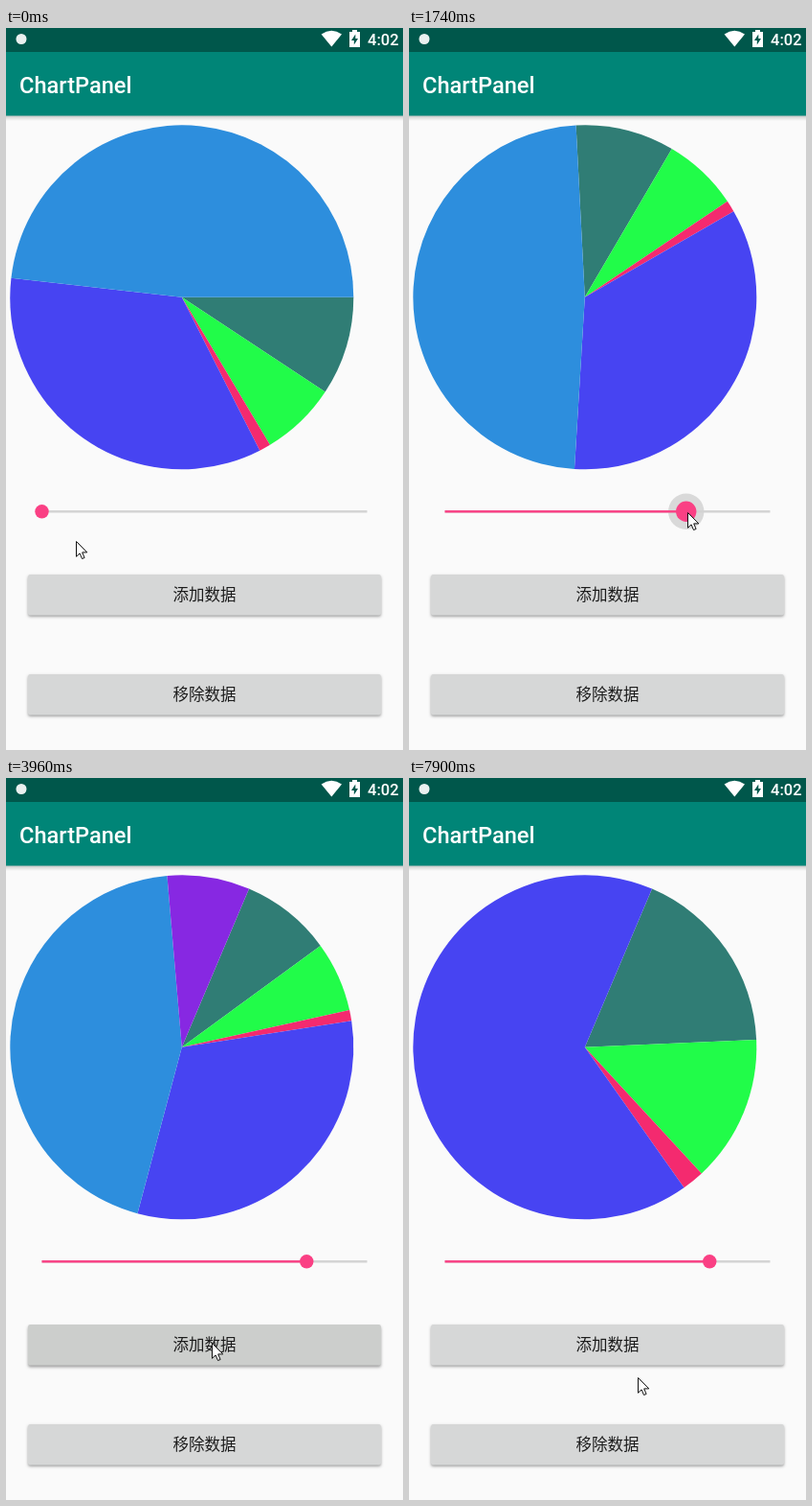
These frames come from a looping animation (415 by 753 pixels, 8000 ms). An HTML page with a canvas:

```html
<!DOCTYPE html>
<html lang="zh-CN">
<head>
<meta charset="utf-8">
<title>Pie chart</title>
<style>
html, body { margin: 0; width: 100%; height: 100%; overflow: hidden; background: #fafafa; }
canvas { display: block; width: 415px; height: 753px; }
</style>
</head>
<body>
<canvas id="stage" width="415" height="753"></canvas>
<script>
const ctx = document.getElementById('stage').getContext('2d');
const LOOP = 8000;
const STEP = 146; // the screen refreshes pointer movement in steps
const TAU = Math.PI * 2;
const PINK = '#fa4084';
const TRACK = { left: 37.5, length: 340, y: 504.3 };

// Slice values in degrees of the first pie; from/to: its span in the data
const SLICES = [
  { value: 33.4, color: '#307d75' },
  { value: 25.7, color: '#21fc49' },
  { value: 3.9, color: '#f42a6f' },
  { value: 123.4, color: '#4744f2' },
  { value: 173.6, color: '#2d8edd', to: 7630 },
  { value: 30.3, color: '#8728e2', from: 3960, to: 7090 },
  { value: 6.5, color: '#f0b012', from: 4350, to: 6550 },
  { value: 53.1, color: '#27020f', from: 4920, to: 6160 }
];

const HOME = { x: 73, y: 535 };
const HANDLE = { x: 37, y: 506 };
const DROP = { x: 317, y: 496 };
const ADD = { x: 215, y: 589 };
const REMOVE = { x: 222, y: 708 };
const END = { x: 239, y: 625 };

const within = (t, from, to) => t >= from && t < to;
const mix = (a, b, u) => a + (b - a) * u;

function ease(t, from, to) {
  const u = Math.min(1, Math.max(0, (t - from) / (to - from)));
  return u * u * (3 - 2 * u);
}

// The handle is dragged right, back left, then right again
function progress(t) {
  const right = 0.752 * ease(t, 604, 1680);
  const back = -0.598 * ease(t, 1680, 2420);
  const again = 0.66 * ease(t, 2420, 2774);
  return right + back + again;
}

const thumbX = t => TRACK.left + TRACK.length * progress(t);

function glide(a, b, u) {
  return { x: mix(a.x, b.x, u), y: mix(a.y, b.y, u) };
}

function cursorAt(t) {
  if (t < 400) return glide(HOME, HANDLE, ease(t, 0, 400));
  if (t < 2940) {
    // The pointer runs slightly ahead of the handle
    const grip = mix(-1, 3, ease(t, 2200, 2774));
    return { x: thumbX(t + 30) + grip, y: mix(HANDLE.y, DROP.y, ease(t, 1400, 2300)) };
  }
  if (t < 5100) return glide(DROP, ADD, ease(t, 2940, 3400));
  if (t < 7600) return glide(ADD, REMOVE, ease(t, 5100, 5540));
  return glide(REMOVE, END, ease(t, 7600, 7880));
}

function rect(x, y, w, h, color) {
  ctx.fillStyle = color;
  ctx.fillRect(x, y, w, h);
}

function disc(x, y, r, color) {
  ctx.fillStyle = color;
  ctx.beginPath();
  ctx.arc(x, y, r, 0, TAU);
  ctx.fill();
}

function polygon(points, color) {
  ctx.fillStyle = color;
  ctx.beginPath();
  points.forEach(([x, y]) => ctx.lineTo(x, y));
  ctx.closePath();
  ctx.fill();
}

function text(str, x, y, font, color, align = 'left') {
  ctx.font = font;
  ctx.fillStyle = color;
  ctx.textAlign = align;
  ctx.fillText(str, x, y);
}

function drawBars() {
  const shade = ctx.createLinearGradient(0, 91.5, 0, 97);
  shade.addColorStop(0, '#c4c6c5');
  shade.addColorStop(0.5, '#e4e5e4');
  shade.addColorStop(1, '#fafafa');
  rect(0, 91, 415, 6, shade);
  rect(0, 0, 415, 25, '#00574b');
  rect(0, 25, 415, 66.5, '#008577');
  disc(16, 11.5, 5.5, '#e9f0ef');

  // Wi-Fi fan
  ctx.fillStyle = '#fff';
  ctx.beginPath();
  ctx.moveTo(340.3, 19.5);
  ctx.lineTo(329.6, 6.4);
  ctx.quadraticCurveTo(340.3, -0.8, 351, 6.4);
  ctx.fill();

  // Charging battery
  rect(362, 2, 5, 3, '#fff');
  rect(359, 4, 11, 16, '#fff');
  polygon([[365.3, 6.5], [361, 13], [363.8, 13], [363.8, 17.5], [368, 11], [365.3, 11]], '#00574b');

  text('4:02', 378, 18, '500 16.5px Roboto, sans-serif', '#fff');
  text('ChartPanel', 14, 68, '500 23.6px Roboto, sans-serif', '#fff');
}

function drawPie(t, turn) {
  const data = SLICES.filter(s => within(t, s.from ?? 0, s.to ?? LOOP));
  const total = data.reduce((sum, s) => sum + s.value, 0);
  let angle = turn * TAU;
  for (const { value, color } of data) {
    const end = angle + value / total * TAU;
    ctx.fillStyle = color;
    ctx.beginPath();
    ctx.moveTo(183.8, 280.8);
    ctx.arc(183.8, 280.8, 179.5, angle, end);
    ctx.fill();
    angle = end;
  }
}

function drawSlider(x, held) {
  const { left, length, y } = TRACK;
  if (held) disc(x, y, 18.7, '#d9d9d9');
  rect(left, y - 1.2, length, 2.4, '#d3d3d3');
  rect(left, y - 1.2, x - left, 2.4, PINK);
  disc(x, y, held ? 10.7 : 7.2, PINK);
}

function drawButton(y, label, pressed) {
  ctx.save();
  ctx.shadowColor = 'rgba(0,0,0,0.36)';
  ctx.shadowBlur = 3;
  ctx.shadowOffsetY = pressed ? 2 : 1.5;
  ctx.fillStyle = pressed ? '#cccecc' : '#d6d7d7';
  ctx.beginPath();
  ctx.roundRect(23, y, 369, 42.6, 2.4);
  ctx.fill();
  ctx.restore();
  text(label, 207.6, y + 27, '400 16.5px "Noto Sans CJK SC", "Noto Sans CJK", sans-serif', '#1c1c1c', 'center');
}

function drawCursor({ x, y }) {
  ctx.save();
  ctx.translate(Math.round(x) + 0.5, Math.round(y) + 0.5);
  polygon([[0, 0], [0, 15.8], [3.6, 12.4], [6, 18], [8.6, 17], [6.2, 11.4], [11.3, 11.4]], '#fff');
  ctx.strokeStyle = '#111';
  ctx.lineWidth = 1;
  ctx.stroke();
  ctx.restore();
}

function draw(t) {
  const tick = Math.floor(t / STEP) * STEP;
  const turn = progress(tick);

  rect(0, 0, 415, 753, '#fafafa');
  drawBars();
  drawPie(t, turn);
  drawSlider(thumbX(tick), within(t, 420, 3030));
  drawButton(570, '添加数据', within(t, 3690, 4350));
  drawButton(674, '移除数据', within(t, 6040, 6550));
  drawCursor(cursorAt(tick));
}

function frame() {
  draw(performance.now() % LOOP);
  requestAnimationFrame(frame);
}
frame();
</script>
</body>
</html>
```
